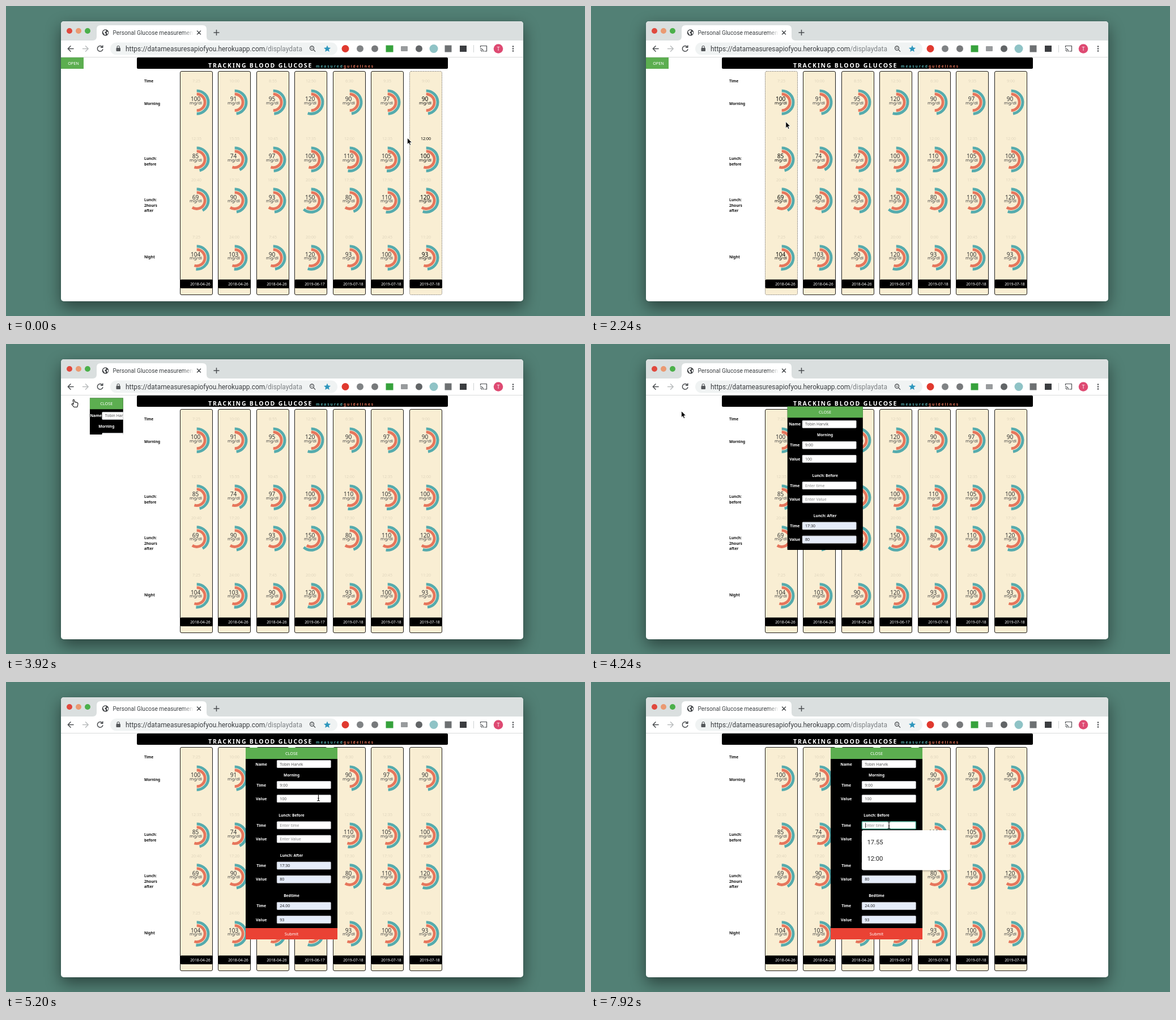
These frames come from a looping animation (1022 px wide and 548 px high, 8 s). An HTML page:

```html
<!DOCTYPE html>
<html lang="en">
<head>
<meta charset="utf-8">
<title>Glucose tracker</title>
<style>
html, body { margin: 0; width: 100%; height: 100%; overflow: hidden; background: #528075; }
.window {
  position: absolute; left: 96.5px; top: 27px; width: 816px; height: 495px;
  border-radius: 5px; background: #fff; overflow: hidden;
}
.shadow {
  position: absolute; left: 96.5px; top: 27px; width: 816px; height: 495px; border-radius: 5px;
  box-shadow: 0 10px 28px rgba(0, 0, 0, .48), 0 0 2px rgba(0, 0, 0, .2);
}
.tabs { height: 34px; background: #dadfdf; }
svg { display: block; }
#stage { position: absolute; left: 0; top: 0; }
text { font-family: "Noto Sans", "Open Sans", sans-serif; font-size: 7px; }
.ui { font-family: Roboto, Arial, sans-serif; }
.mid { text-anchor: middle; }
.label { font-weight: 600; font-size: 6.6px; fill: #111; }
.line { fill: none; stroke: #4a4d50; stroke-width: 1.5; stroke-linecap: round; stroke-linejoin: round; }
.col > rect:first-child { fill: #f9eed3; stroke: #1c1b18; }
.col .value { font-size: 10.1px; fill: #333; }
.col .unit { font-size: 7.9px; fill: #444; }
.col .time { fill: #000; opacity: .1; font-size: 7px; }
.col .date { fill: #fff; font-size: 6.8px; font-weight: 500; text-anchor: end; }
.col.hot > rect:first-child { stroke: #8f8b84; stroke-dasharray: 2 1; }
.col.hot .value { fill: #000; font-weight: 500; }
.col.hot .unit { fill: #111; }
.col .time.lit { opacity: 1; font-weight: 500; }
.teal { stroke: #55abad; }
.coral { stroke: #e6765c; }
.arc { fill: none; stroke-width: 4.9; }
#panel { overflow: hidden; }
#panel text { fill: #fff; }
#panel .name { font-weight: 600; font-size: 6.9px; }
#panel .head { font-weight: 600; font-size: 6.6px; }
#panel .bar { font-size: 7.3px; }
#panel .typed { fill: #555; }
#panel .filled { fill: #222; }
#panel .hint { fill: #888; }
</style>
</head>
<body>
<div class="shadow"></div>
<div class="window"><div class="tabs"></div></div>
<svg id="stage" width="1022" height="548" viewBox="0 0 1022 548">
  <defs>
    <linearGradient id="fade" x1="0" x2="1">
      <stop offset="0" stop-color="#fff" stop-opacity="0"/><stop offset="1" stop-color="#fff"/>
    </linearGradient>
    <clipPath id="titleClip"><rect x="185" y="38" width="146" height="18"/></clipPath>
    <filter id="soft" x="-10%" y="-10%" width="120%" height="130%">
      <feDropShadow dx="0" dy="1.5" stdDeviation="1.8" flood-opacity=".35"/>
    </filter>
  </defs>

  <!-- tab strip -->
  <circle cx="112" cy="44" r="5" fill="#e0493e"/>
  <circle cx="128" cy="44" r="5" fill="#ea9a72"/>
  <circle cx="144" cy="44" r="5" fill="#4bb04a"/>
  <path d="M153 61q7 0 7-7V41q0-7 7-7H347q7 0 7 7V54q0 7 7 7Z" fill="#fff"/>
  <circle cx="175.5" cy="47" r="5.8" fill="#3f4245"/>
  <path d="M171 45.5q2.5-3.5 5-3l1 2-2.5 1.5v1.5l2 1.5-1.5 3q-1-2-2-2.5ZM177.500 46.5l2-1.5 1 2.5-1.5 3Z" fill="#fff"/>
  <g clip-path="url(#titleClip)">
    <text class="ui" x="188.5" y="50.7" style="font-size:10.2px" fill="#3c4043">Personal Glucose measurements</text>
    <rect x="313" y="38" width="18" height="18" fill="url(#fade)"/>
  </g>
  <path class="line" d="M337.5 44l6 6m0-6l-6 6M371.5 42.5v9m-4.5-4.5h9"/>

  <!-- toolbar -->
  <rect x="97" y="90" width="815.5" height="1" fill="#d9dcdc"/>
  <rect x="184" y="64.5" width="401" height="22" rx="11" fill="#f0f3f3"/>
  <path class="line" d="M119 75.5h-9.5m4.5-4.7l-4.7 4.7 4.7 4.7"/>
  <path class="line" style="stroke:#b9bcbd" d="M135.5 75.5h9.5m-4.5-4.7l4.7 4.7-4.7 4.7"/>
  <path class="line" d="M170 72.5a4.8 4.8 0 1 0 .8 4.2M170.8 70v3.3h-3.4"/>
  <rect x="194.5" y="74" width="7.5" height="6" rx="1" fill="#55585b"/>
  <path class="line" style="stroke:#55585b;stroke-width:1.2" d="M196.2 74v-1.5a2 2 0 0 1 4 0v1.5"/>
  <text class="ui" x="211" y="79.5" style="font-size:11.92px" fill="#3a3d40">https://datameasuresapiofyou.herokuapp.com<tspan fill="#7d8184">/displaydata</tspan></text>
  <circle class="line" style="stroke-width:1.3" cx="540" cy="74.5" r="3.5"/>
  <path class="line" style="stroke-width:1.2" d="M543 77.5l2.8 2.8M538.7 74.5h2.6"/>
  <path d="M567 69.5l1.700 4 4.400.4-3.300 2.900 1 4.300-3.800-2.300-3.800 2.300 1-4.300-3.300-2.900 4.400-.4Z" fill="#2e97bd"/>
  <circle cx="599" cy="75.5" r="6.5" fill="#e0392f"/>
  <circle cx="625" cy="75.5" r="6" fill="#808385"/>
  <circle cx="651" cy="75.5" r="6" fill="#77797b"/>
  <rect x="670.5" y="69.5" width="13" height="12" fill="#36a23c"/>
  <rect x="697" y="71" width="12" height="9" rx="1" fill="#989b9d"/>
  <circle cx="729" cy="75.5" r="6" fill="#626567"/>
  <circle cx="755" cy="75.5" r="7.5" fill="#8fc3c6"/>
  <rect x="774.5" y="69.5" width="12" height="12" fill="#6d7072"/>
  <rect x="801" y="70" width="12" height="11" fill="#3b3d40"/>
  <rect x="825" y="69" width="1" height="13" fill="#cfd2d3"/>
  <path class="line" style="stroke-width:1.2" d="M837.5 73v-2.5h11v9.5h-4M837.5 75.3a5 5 0 0 1 5 5M837.5 78a2.3 2.3 0 0 1 2.3 2.3"/>
  <circle cx="869" cy="75.5" r="8.3" fill="#de4a72"/>
  <text class="ui mid" x="869" y="78.5" style="font-size:8.5px" fill="#fff">T</text>
  <g fill="#4a4d50"><circle cx="895" cy="71.5" r="1.3"/><circle cx="895" cy="75.5" r="1.3"/><circle cx="895" cy="79.5" r="1.3"/></g>

  <!-- page -->
  <rect x="231" y="91" width="549" height="20" rx="2"/>
  <text x="357" y="109" style="font-size:10.5px;font-weight:700;letter-spacing:1.8px" fill="#fff">TRACKING BLOOD GLUCOSE</text>
  <text x="547" y="109" style="font-size:6.5px;font-weight:700;letter-spacing:2.06px" fill="#55abad">measured<tspan fill="#e6765c">guidelines</tspan></text>
  <g id="labels"></g>
  <g id="columns"></g>
  <g id="open">
    <rect x="97" y="91" width="40" height="20" fill="#5cae50"/>
    <text class="mid" x="119" y="104.2" style="font-size:7.3px" fill="#fff">OPEN</text>
  </g>
  <svg id="panel"></svg>
  <g id="menu">
    <rect x="478" y="262" width="155.5" height="70.5" rx="3" fill="#fff" filter="url(#soft)"/>
    <text class="ui" x="487.5" y="287" style="font-size:11.2px" fill="#222">17.55</text>
    <text class="ui" x="487.5" y="316" style="font-size:11.2px" fill="#222">12:00</text>
  </g>
  <g id="cursor">
    <path id="arrow" d="M0 0V11.5L2.6 9.2 4.3 13.2 6.3 12.3 4.6 8.4H8.2Z" stroke="#fff" stroke-width=".9"/>
    <path id="hand" d="M-1.3 .8Q0-.8 1 .8L1.8 4.5Q3 3.5 4 5Q5.3 4.2 6 5.7Q7.5 5.3 7.5 7L7 11 6 13.2H.5L-3.3 8.5Q-3.5 6.8-1.8 7.3L-.3 8.2Z" fill="#fff" stroke="#111" stroke-width="1.1" stroke-linejoin="round"/>
    <path id="beam" d="M-2.3-6Q0-6 0-4.5V4.5Q0 6-2.3 6M2.3-6Q0-6 0-4.5M0 4.5Q0 6 2.3 6M-1.3 1.5H1.3" fill="none" stroke="#111" stroke-width="1.1"/>
  </g>
</svg>
<script>
const LOOP = 8000, OPEN_AT = 3790, OPEN_TIME = 970, MENU_AT = 6600;
const $ = id => document.getElementById(id);

function add(parent, tag, attrs, text) {
  const node = document.createElementNS('http://www.w3.org/2000/svg', tag);
  set(node, attrs);
  if (text !== undefined) node.textContent = text;
  return parent.appendChild(node);
}
function set(node, attrs) {
  for (const key in attrs) node.setAttribute(key, attrs[key]);
}
function show(node, on) {
  node.style.display = on ? '' : 'none';
}

[['Time', 134.5], ['Morning', 175], ['Lunch:', 272], ['before', 282], ['Lunch:', 345],
 ['2hours', 354.5], ['after', 364.3], ['Night', 446]]
  .forEach(([s, y]) => add($('labels'), 'text', { class: 'label', x: 244, y }, s));

// One row per measurement of the day; limit is the guideline value.
const rows = [
  { cy: 170.2, timeY: 132, limit: 100, values: [100, 91, 95, 120, 90, 97, 90],
    times: '7:25 10:00 8:55 12:50 6:30 9:35 9:00' },
  { cy: 271.2, timeY: 234, limit: 120, values: [85, 74, 97, 100, 110, 105, 100],
    times: '12:35 15:55 10:45 17:35 12:00 12:35 12:00' },
  { cy: 344, timeY: 307, limit: 140, values: [69, 90, 93, 150, 80, 110, 120],
    times: '20:40 17:20 18:00 20:00 17:30 17:10 17:30' },
  { cy: 445, timeY: 408, limit: 120, values: [104, 103, 90, 120, 93, 100, 93],
    times: '7:25 24:00 7:45 20:00 0:00 20:45 11:20' },
];
const dates = ['2018-04-26', '2018-04-26', '2018-04-26', '2019-06-17',
  '2019-07-18', '2019-07-18', '2019-07-18'];

function arc(parent, kind, cx, cy, r, value) {
  const a = Math.PI * Math.sqrt(value / 100);
  const end = [cx + r * Math.sin(a), cy - r * Math.cos(a)];
  add(parent, 'path', { class: 'arc ' + kind,
    d: `M${cx} ${cy - r}A${r} ${r} 0 ${a > Math.PI ? 1 : 0} 1 ${end}` });
}

const columns = dates.map((date, i) => {
  const x = Math.round(306.6 + 67.5 * i) + .5;
  const g = add($('columns'), 'g', { class: 'col' });
  add(g, 'rect', { x, y: 115.5, width: 57, height: 395, rx: 2.5 });
  const times = rows.map(row => {
    const { cy, timeY } = row;
    const time = add(g, 'text', { class: 'time mid', x: x + 28.5, y: timeY + 2.5 }, row.times.split(' ')[i]);
    arc(g, 'teal', x + 29.2, cy, 20.3, row.values[i]);
    arc(g, 'coral', x + 29.2, cy, 14.4, row.limit);
    add(g, 'text', { class: 'value mid', x: x + 27.1, y: cy - 2.4 }, row.values[i]);
    add(g, 'text', { class: 'unit mid', x: x + 27.6, y: cy + 3.4 }, 'mg/dl');
    return time;
  });
  add(g, 'rect', { x, y: 483.5, width: 57.5, height: 15.5, rx: 2 });
  add(g, 'text', { class: 'date', x: x + 53.2, y: 493.8 }, date);
  return { x, g, times };
});

// Entry form
const panel = $('panel');
add(panel, 'rect', { width: 170, height: 340 });
const centred = [], fields = [];
function bar(y, fill, text) {
  add(panel, 'rect', { y, width: 170, height: 20, fill });
  centred.push({ node: add(panel, 'text', { class: 'bar mid' }, text), y: y + 12.7, fixed: true });
}
function field(label, y, text, kind) {
  fields.push({
    y, label: add(panel, 'text', { class: 'name mid' }, label),
    box: add(panel, 'rect', { width: 95, height: 13, rx: 1, stroke: '#c9ccd0', 'stroke-width': .8,
      fill: kind === 'filled' ? '#e5ecf9' : '#fff' }),
    text: add(panel, 'text', { class: kind }, text),
  });
}
bar(0, '#5cae50', 'CLOSE');
field('Name', 29, 'Tobin Harvik', 'typed');
[['Morning', '9:00', '100', 'typed'], ['Lunch: Before', 'Enter time', 'Enter Value', 'hint'],
 ['Lunch: After', '17:30', '80', 'filled'], ['Bedtime', '24.00', '93', 'filled']]
  .forEach(([head, time, value, kind], i) => {
    const y = 48 + 71.3 * i;
    centred.push({ node: add(panel, 'text', { class: 'head mid' }, head), y: y + 2.5 });
    field('Time', y + 18, time, kind);
    field('Value', y + 42.2, value, kind);
  });
bar(319, '#ea4234', 'Submit');
const focus = fields[3].box;
const caret = add(panel, 'rect', { x: 61, y: 133, width: .8, height: 9, fill: '#222' });

// CSS "ease" timing curve
function ease(x) {
  if (x <= 0) return 0;
  if (x >= 1) return 1;
  let lo = 0, hi = 1, s;
  for (let i = 0; i < 24; i++) {
    s = (lo + hi) / 2;
    const bx = .75 * s * (1 - s) * (1 - s) + .75 * s * s * (1 - s) + s ** 3;
    if (bx < x) lo = s; else hi = s;
  }
  return .3 * s * (1 - s) * (1 - s) + 3 * s * s * (1 - s) + s ** 3;
}

function layout(p) {
  const b = { x: 97 + 326 * p, y: 91.5 + 24.5 * p, w: 40 + 122 * p, h: 24 + 252 * p + 63 * p * p };
  set(panel, { x: b.x, y: b.y, width: b.w, height: b.h });
  const dy = b.w < 150 ? 2.6 : 0, left = Math.max(22, b.w - 106.7);
  centred.forEach(c => set(c.node, { x: b.w / 2, y: c.y + (c.fixed ? 0 : dy) }));
  fields.forEach(f => {
    const y = f.y + dy;
    set(f.label, { x: left / 2, y: y + 2.5 });
    set(f.box, { x: left, y: y - 6.5 });
    set(f.text, { x: left + 5, y: y + 2.5 });
  });
  return b;
}

const path = [[0, 708.5, 233], [1520, 496.5, 209], [2240, 344, 204.5], [3400, 119.5, 98.3],
  [3950, 119.5, 98.3], [4240, 159, 118.3], [5150, 551.5, 204], [5400, 551.5, 204],
  [6400, 526, 253], [LOOP, 526, 253]];
function pointer(t) {
  const i = path.findIndex(k => k[0] > t);
  const [t0, x0, y0] = path[i - 1], [t1, x1, y1] = path[i];
  const u = (t - t0) / (t1 - t0);
  return [x0 + (x1 - x0) * u, y0 + (y1 - y0) * u];
}

function draw(t) {
  const opened = t >= OPEN_AT, menu = t >= MENU_AT;
  const [x, y] = pointer(t);
  show($('open'), !opened);
  show(panel, opened);
  show($('menu'), menu);
  show(caret, menu);
  set(focus, { stroke: menu ? '#4aa58f' : '#c9ccd0', 'stroke-width': menu ? 1.4 : .8 });

  let covered = false, overField = false;
  if (opened) {
    const b = layout(ease((t - OPEN_AT) / OPEN_TIME));
    const px = x - b.x, py = y - b.y;
    covered = px > 0 && px < b.w && py > 0 && py < b.h;
    overField = covered && px > b.w - 106.7 && px < b.w - 11 &&
      fields.some(f => Math.abs(py - f.y) < 7);
  }
  columns.forEach(c => {
    const hot = !covered && x > c.x - 5 && x < c.x + 57 && y > 115;
    c.g.classList.toggle('hot', hot);
    c.times.forEach((node, i) => node.classList.toggle('lit', hot && Math.abs(y - rows[i].timeY) < 8));
  });

  const kind = t > 3320 && t < 4040 ? 'hand' : overField ? 'beam' : 'arrow';
  ['arrow', 'hand', 'beam'].forEach(id => show($(id), id === kind));
  set($('cursor'), { transform: `translate(${x} ${y})` });
}

function tick() {
  draw(performance.now() % LOOP);
  requestAnimationFrame(tick);
}
tick();
</script>
</body>
</html>
```
